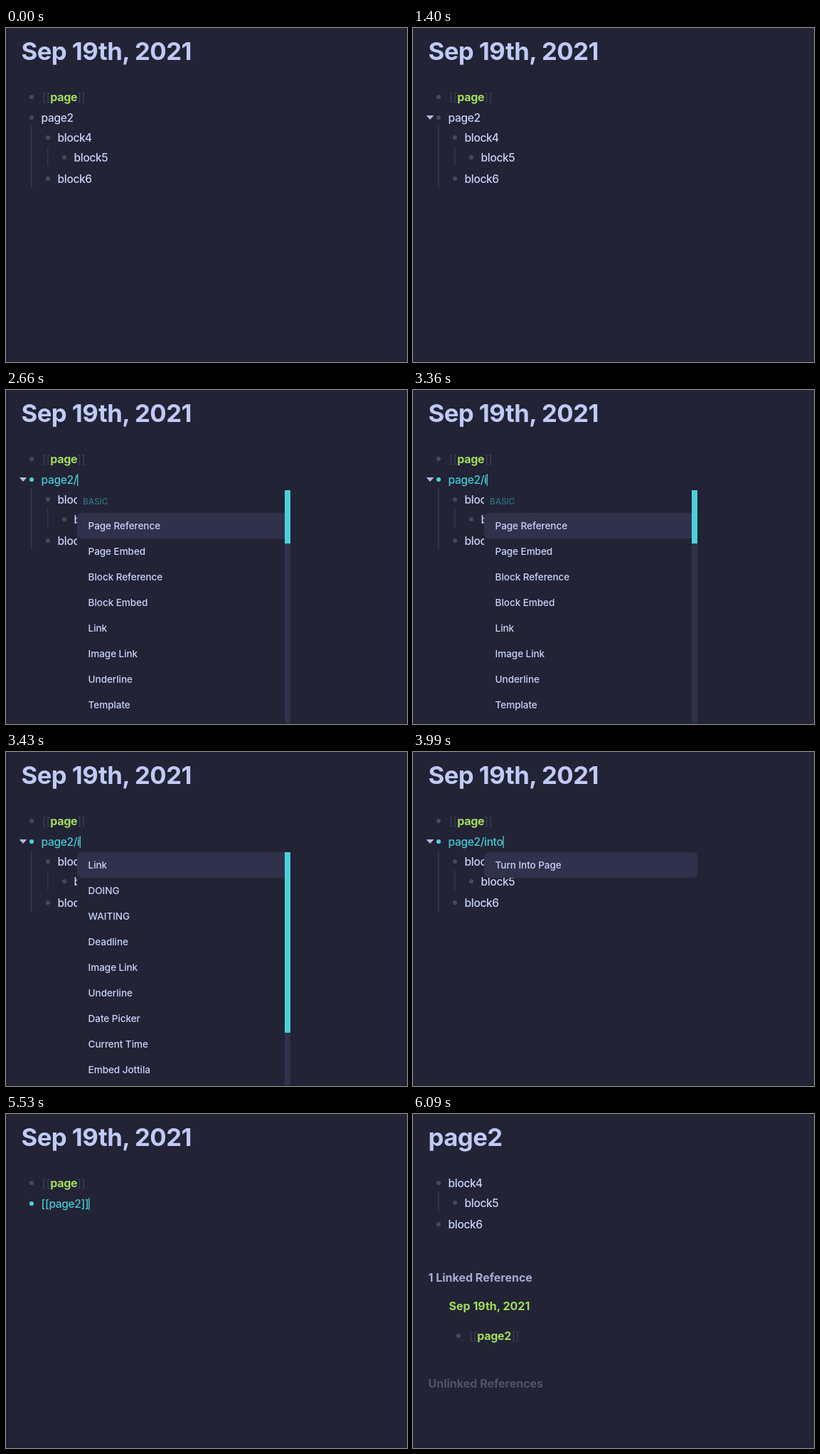
Recreate the animation shown at these times as an HTML page. Size 564x470 px, loop 7910 ms.

```html
<!DOCTYPE html>
<html lang="en">
<head>
<meta charset="utf-8">
<title>Turn a block into a page</title>
<style>
  html, body { margin: 0; height: 100%; overflow: hidden; background: #222335; }
  svg { display: block; }
  text { font: 500 15.5px Inter, Roboto, sans-serif; letter-spacing: -.022em; fill: #c9d3f8; white-space: pre; }
  .title { font-size: 34.7px; font-weight: 700; letter-spacing: -.015em; fill: #c0caf5; }
  .bold { font-weight: 700; font-size: 16px; letter-spacing: 0; }
  .link { font-weight: 700; font-size: 16px; letter-spacing: 0; fill: #a3dc5c; }
  tspan.link { letter-spacing: -.018em; }
  .dim { font-weight: 400; letter-spacing: 0; fill: #3e4056; }
  .edit { fill: #46c9d2; }
  .item { font-size: 13.55px; letter-spacing: -.005em; }
  .group { font-size: 11.7px; letter-spacing: 0; fill: #2f7380; }
</style>
</head>
<body>
<svg id="stage" width="564" height="470" viewBox="0 0 564 470"></svg>
<script>
const LOOP = 7910, BG = '#222335', PANEL = '#30324c', CYAN = '#4dd0d8';
const stage = document.getElementById('stage');

// Slash menus: rows, plus a group heading and scrollbar thumb height where present
const menus = {
  all: { group: 'BASIC', thumb: 75, rows: ['Page Reference', 'Page Embed', 'Block Reference', 'Block Embed',
    'Link', 'Image Link', 'Underline', 'Template'] },
  i: { thumb: 254, rows: ['Link', 'DOING', 'WAITING', 'Deadline', 'Image Link', 'Underline',
    'Date Picker', 'Current Time', 'Embed Jottila'] },
  in: { rows: ['Link', 'DOING', 'WAITING', 'Deadline', 'Image Link', 'Underline',
    'Turn Into Page', 'Query table function'] },
  into: { rows: ['Turn Into Page'] }
};

// Start time, block text, caret shown, open menu
const edits = [
  [1820, 'page2', true],
  [2310, 'page2', false],
  [2660, 'page2/', true, 'all'],
  [3150, 'page2/', false, 'all'],
  [3360, 'page2/i', true, 'all'],
  [3430, 'page2/i', true, 'i'],
  [3570, 'page2/in', true, 'i'],
  [3640, 'page2/in', true, 'in'],
  [3850, 'page2/int', true, 'in'],
  [3990, 'page2/into', true, 'into'],
  [4550, 'page2', true],
  [4620, '[[page2]]', true]
];

const text = (x, y, s, cls = '') => `<text x="${x}" y="${y}" class="${cls}">${s}</text>`;
const rect = (x, y, w, h, fill, r = 0) =>
  `<rect x="${x}" y="${y}" width="${w}" height="${h}" rx="${r}" fill="${fill}"/>`;
const bullet = (x, y, fill = '#464860') => `<circle cx="${x}" cy="${y}" r="3.1" fill="${fill}"/>`;
const block = (x, y, s) => bullet(x, y) + text(x + 13.6, y + 6, s);
const guide = (x, y, h) => rect(x - 1, y, 1.5, h, '#36384e');
const pageLink = (x, y, s) => bullet(x, y) + text(x + 15, y + 6,
  `<tspan class="dim">[[</tspan><tspan class="link">${s}</tspan><tspan class="dim">]]</tspan>`);

function menu({ group, thumb, rows }) {
  const top = group ? 173 : 141;
  return rect(100, 141, 300, thumb ? 329 : rows.length * 36, BG, 6) +
    (group ? text(108, 161, group, 'group') : '') +
    rect(100, top, 300, 36, PANEL, 6) +
    rows.map((s, i) => text(115.6, top + 23 + i * 36, s, 'item')).join('') +
    (thumb ? rect(392, 141, 8, 329, PANEL) + rect(392, 141, 8, thumb, CYAN) : '');
}

function journal(t) {
  const [, words, caret, open] = edits.findLast(e => t >= e[0]) || [0, 'page2'];
  const editing = t >= 1820, nested = t < 4620;
  let out = text(21.5, 45, 'Sep 19th, 2021', 'title') + pageLink(36, 97, 'page');
  if (nested) {
    out += guide(36, 138, 87) + guide(59, 167, 27) +
      block(59, 154, 'block4') + block(82, 182, 'block5') + block(59, 212, 'block6');
    if (t >= 1400) out += '<path d="M19.5 123.5h9l-4.5 5z" fill="#b3b9de" stroke="#b3b9de" stroke-linejoin="round"/>';
  }
  out += bullet(36, 126, editing ? CYAN : undefined) +
    `<text id="line" x="49.6" y="132" class="${editing ? 'edit' : ''}">${words}</text>`;
  if (caret) out += '<rect id="caret" y="118" width="1.2" height="17" fill="#58d8e0"/>';
  return out + (open ? menu(menus[open]) : '');
}

const page = () =>
  text(21.5, 45, 'page2', 'title') + guide(36, 110, 28) +
  block(36, 97, 'block4') + block(59, 125, 'block5') + block(36, 155, 'block6') +
  text(21.5, 236, '<tspan fill="#a6abd2">1 Linked Reference</tspan>', 'bold') +
  text(50.5, 276, 'Sep 19th, 2021', 'link') + pageLink(64, 312, 'page2') +
  text(21.5, 385, '<tspan fill="#50526b">Unlinked References</tspan>', 'bold');

let shown = '';
function draw(now) {
  const t = now % LOOP;
  const view = (t < 6090 ? journal(t) : page()) + rect(0, 469, 564, 1, '#1c1d2c');
  if (view !== shown) {
    stage.innerHTML = shown = view;
    const caret = document.getElementById('caret');
    if (caret) caret.setAttribute('x', 49.6 + document.getElementById('line').getComputedTextLength());
  }
  requestAnimationFrame(draw);
}
draw(0);
</script>
</body>
</html>
```
